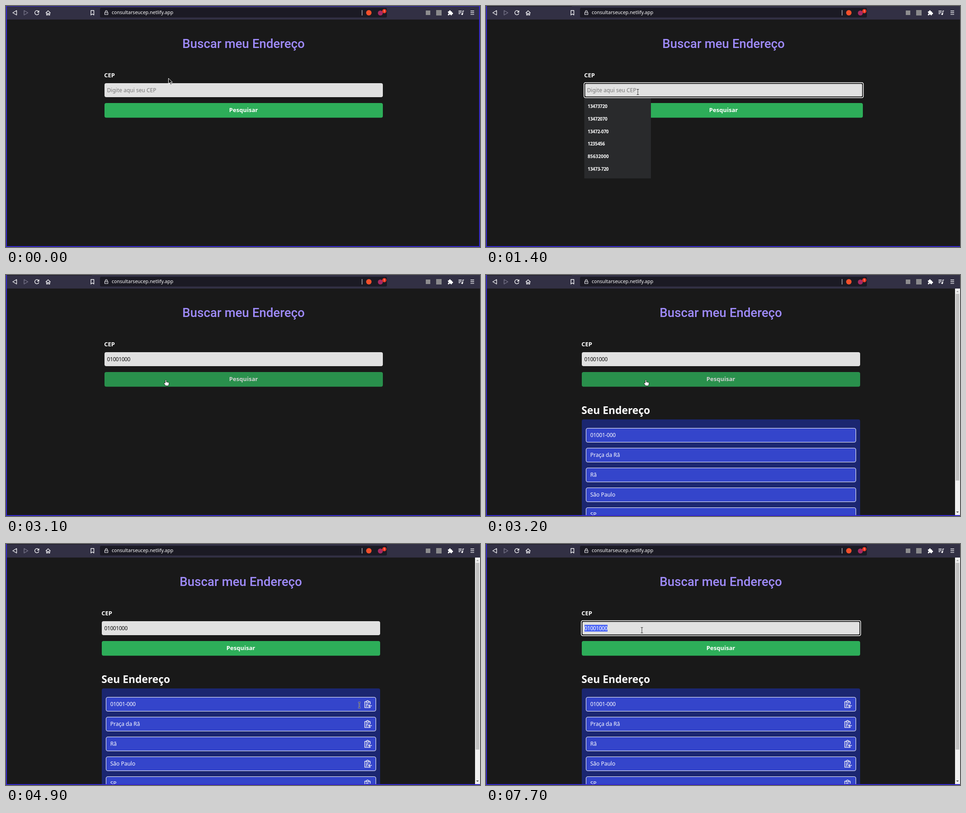
Animation, 1049 px wide and 534 px high, one loop 8 s. Source, as an HTML page:

```html
<!DOCTYPE html>
<html lang="pt-BR">
<head>
<meta charset="utf-8">
<title>Buscar meu Endereço</title>
<style>
  html, body { margin: 0; width: 100%; height: 100%; overflow: hidden; background: #191919; }
  svg { display: block; width: 1049px; height: 534px; font: 12px "Noto Sans", "Open Sans", sans-serif; fill: #fff; }
  .line { fill: none; stroke: #f2f2f5; stroke-width: 1.4; stroke-linejoin: round; }
  .mid { text-anchor: middle; }
  .digits { letter-spacing: -.45px; }
</style>
</head>
<body>
<svg viewBox="0 0 1049 534">
  <rect width="1049" height="534" fill="#191919"/>

  <g id="page">
    <text class="mid" x="525.7" y="93" font-family="Roboto, sans-serif" font-size="27.7" font-weight="500" fill="#9f8bfb">Buscar meu Endereço</text>
    <text x="217.3" y="158" font-size="13" font-weight="600">CEP</text>
    <rect x="218" y="171" width="616" height="31" rx="4" fill="#e1e1e1"/>
    <g id="focus" fill="none">
      <rect x="218.5" y="171.5" width="615" height="30" rx="3" stroke="#101010" stroke-width="2"/>
      <rect x="216.8" y="169.8" width="618.4" height="33.4" rx="3.5" stroke="#fff" stroke-width="1.5"/>
    </g>
    <rect id="selection" x="224" y="179" width="51" height="15" fill="#4c66f5"/>
    <text id="value" x="223.6" y="191"></text>
    <rect id="caret" y="179" width="1" height="15" fill="#111"/>
    <g id="button">
      <rect x="218" y="215" width="616" height="32.5" rx="4" fill="#2dae59"/>
      <text class="mid" x="525.7" y="235.3" font-size="13.1" font-weight="600">Pesquisar</text>
    </g>
    <g id="suggestions" font-size="10" font-weight="600">
      <rect x="217.5" y="204" width="147.5" height="178" fill="#292a2c"/>
    </g>
    <g id="results">
      <text x="217.3" y="308" font-size="22.8" font-weight="600">Seu Endereço</text>
      <path d="M218 534V324q0-4 4-4h608q4 0 4 4V534z" fill="#1b2670"/>
    </g>
  </g>

  <g id="scrollbar">
    <rect x="1038" y="30" width="11" height="502" fill="#f1f1f1"/>
    <rect x="1039.5" y="41.5" width="8" height="414" fill="#c1c1c1"/>
    <path d="M1040.500 38l3-3 3 3z" fill="#a3a3a3"/>
    <path d="M1040.500 524l3 3 3-3z" fill="#505050"/>
  </g>

  <rect width="1049" height="30" fill="#323044"/>
  <rect id="tabEdge" x="2" width="188" height="1" fill="#1a1922"/>
  <rect x="208" y="4" width="635" height="21.5" rx="3" fill="#1b1a24"/>
  <g class="line">
    <path d="M23.500 10v10l-8.500-5z"/>
    <path d="M40 10v10l8.500-5z" stroke="#77758a"/>
    <path d="M72 12.200a4.600 4.600 0 1 0 .7 4"/>
    <path d="M88 15.500l5.200-5 5.200 5M89.800 14.500v5.500h2.200v-3.500h2.500v3.500h2.200v-5.500"/>
    <path d="M188 10h6.500v10l-3.200-2.500-3.300 2.500z"/>
    <path d="M218.500 14h7v5h-7zM220 14v-2a2 2 0 0 1 4 0v2M222 16v1" stroke-width="1.1"/>
    <path d="M788 9v12" stroke-width="1"/>
    <path d="M1001.500 11h7M1001.500 14h7M1001.500 17h4M1011 17.500V11h2.500"/>
    <path d="M1028 11h8M1028 14.800h8M1028 18.600h8"/>
  </g>
  <path d="M73.500 9.500v5h-5z"/>
  <circle cx="1009.5" cy="18" r="1.9"/>
  <path d="M978 12h2.600a1.900 1.900 0 1 1 3.600 0h2.600v2.600a1.900 1.900 0 1 1 0 3.600v2.300h-2.600a1.700 1.700 0 0 0-3.400 0H978v-2.600a1.700 1.700 0 0 0 0-3.400z"/>
  <text x="234" y="18.4" font-size="10.55">consultarseucep.netlify.app</text>
  <circle cx="803" cy="15" r="6" fill="#f4502b"/>
  <circle cx="828.5" cy="15.5" r="5.5" fill="#a62a62"/>
  <circle cx="837.3" cy="11.5" r="4.7" fill="#ee3420"/>
  <text class="mid" x="837.3" y="14" font-size="7">1</text>
  <rect x="929" y="10" width="10" height="10" fill="#8d8d8f"/>
  <rect x="952" y="9" width="12" height="12" fill="#8a8a8c"/>

  <path d="M0 0h2v534H0zM0 532h1049v2H0z" fill="#3428cc"/>
  <path id="windowEdge" d="M0 0h1049v534h-2V1H0z" fill="#3428cc"/>

  <g id="cursor">
    <path id="arrow" d="M.5 0V12.300l2.900-2.500 2.200 4.700 2-.9-2.200-4.600h4z" fill="#141414" stroke="#fff"/>
    <g id="ibeam" fill="none">
      <path d="M-2.500-6H2.500M0-6V6M-2.500 6H2.500" stroke="#fff" stroke-width="2.6" stroke-opacity=".7"/>
      <path d="M-2.500-6H2.500M0-6V6M-2.500 6H2.500" stroke="#181818"/>
    </g>
    <path id="hand" d="M-1.500 6V.5a1.200 1.200 0 0 1 2.400 0V4l4.600 1q1.500.5 1.400 2l-.7 3.200-1 2.300H-.5l-4-5q0-1.600 1.500-1.300z" stroke="#151515" stroke-width=".9"/>
  </g>
</svg>
<script>
const el = Object.fromEntries([...document.querySelectorAll('[id]')].map(e => [e.id, e]));
const show = (e, on) => e.setAttribute('visibility', on ? 'visible' : 'hidden');
const ramp = (t, start, length) => Math.min(1, Math.max(0, (t - start) / length));

// Autocomplete entries and result rows
['13473720', '13472070', '13472-070', '1235456', '85632000', '13473-720'].forEach((code, i) => {
  const spacing = code[0] === '1' ? -.3 : .15;
  el.suggestions.innerHTML += `<text x="225" y="${226.2 + i * 27.7}" letter-spacing="${spacing}">${code}</text>`;
});
const clipboard = `<path class="line" d="M803 362.500H800V349.500h3.500M809 349.500h3v5.500M803.500 348h1.500q1.200-2.500 2.400 0h1.600v3h-5.500zM802.500 354.500h6M802.500 357h4M802.500 359.500h3M800 362.500h12v-2M815.500 358.500h-7M811 356l-2.800 2.500 2.800 2.500"/>`;
const copyButton = `<rect id="hot" x="791" y="340" width="33" height="30" rx="3" fill="#2c3bae"/>
  <rect id="ring" x="790" y="338" width="36" height="34" rx="4" fill="none" stroke="#4b35d8" stroke-width="3"/>`;
['01001-000', 'Praça da Rã', 'Rã', 'São Paulo', 'SP'].forEach((text, i) => {
  el.results.innerHTML += `<g transform="translate(0 ${i * 44})">
    <rect x="227.5" y="339.5" width="597" height="31" rx="3.5" fill="#3445cb" stroke="#fff"/>
    ${i ? '' : copyButton}
    <text x="236.7" y="359" letter-spacing="${i ? 0 : -.3}">${text}</text>
    <g class="copy">${clipboard}</g></g>`;
});
const copies = document.querySelectorAll('.copy');
el.hot = document.getElementById('hot');
el.ring = document.getElementById('ring');

// Pointer track: time, x, y
const track = [
  [0, 359, 160], [100, 359, 160], [700, 335, 188], [1000, 335, 188], [1100, 335, 189], [1200, 335, 189],
  [1300, 336, 190], [1400, 336, 190.5], [1800, 336, 190.5], [2200, 336, 192], [2300, 336, 192],
  [2400, 337, 194], [2500, 337, 194], [2900, 354, 233], [4100, 354, 233], [4900, 782, 357],
  [5100, 797, 359], [5200, 797, 359], [5400, 795, 361], [5700, 795, 361], [5800, 773, 350],
  [5900, 773, 350], [6000, 666, 251], [6200, 520, 120], [6400, 400, 88], [6700, 340, 165],
  [6800, 339, 186], [7300, 345, 191], [8000, 345, 191]
];

function pointer(t) {
  const i = track.findIndex(k => k[0] > t);
  const [t0, x0, y0] = track[i - 1], [t1, x1, y1] = track[i];
  const u = (t - t0) / (t1 - t0);
  return [x0 + (x1 - x0) * u, y0 + (y1 - y0) * u];
}

function draw(t) {
  const found = t >= 3200, filled = t >= 2000, selected = t >= 7700;
  const focused = (t >= 900 && t < 2900) || t >= 7200;

  el.page.setAttribute('transform', `translate(${found ? -6 : 0} 0)`);
  show(el.results, found);
  show(el.scrollbar, found);
  show(el.windowEdge, t < 200);
  show(el.tabEdge, t >= 200);
  show(el.focus, focused);
  show(el.suggestions, t >= 900 && !filled);
  show(el.selection, selected);
  show(el.caret, (t >= 900 && t < 1400) || (t >= 1900 && t < 2600) || (t >= 7200 && t < 7700));
  el.caret.setAttribute('x', filled ? 275 : 224);
  el.value.textContent = filled ? '01001000' : 'Digite aqui seu CEP';
  el.value.setAttribute('class', filled ? 'digits' : '');
  el.value.setAttribute('fill', selected ? '#fff' : filled ? '#111' : '#777');
  el.button.setAttribute('opacity', 1 - .2 * (ramp(t, 2700, 200) - ramp(t, 4200, 200)));

  const [x, y] = pointer(t);
  const onButton = y > 214 && y < 248;
  const onRow = found && y > 339 && y < 371;
  const onCopy = onRow && x > 785;
  const onField = y > 171 && y < 203;
  el.cursor.setAttribute('transform', `translate(${x} ${y})`);
  show(el.hand, onButton || onCopy);
  show(el.ibeam, onField || (onRow && !onCopy));
  show(el.arrow, !onField && !onButton && !onRow);

  show(el.hot, onCopy);
  show(el.ring, t >= 5600 && t < 7300);
  el.ring.setAttribute('opacity', .6 * (ramp(t, 5500, 200) - ramp(t, 7100, 200)));
  copies.forEach(c => show(c, t >= 3600));
}

function frame() {
  draw(Math.floor(performance.now() % 8000 / 100) * 100);
  requestAnimationFrame(frame);
}
frame();
</script>
</body>
</html>
```
